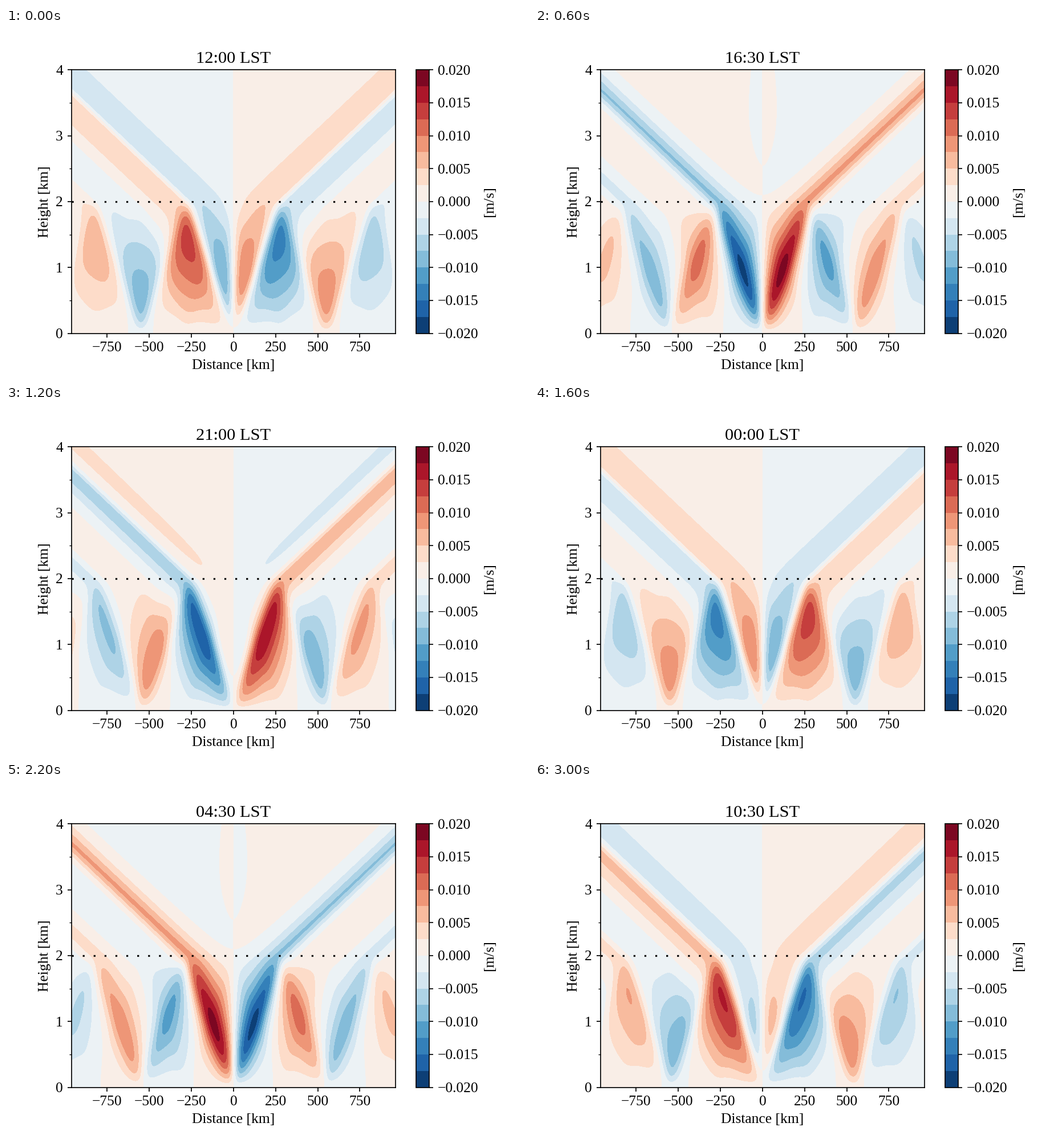
These frames come from a looping animation (917x611 px, 3200 ms). A matplotlib script:

```python
import numpy as np
import matplotlib.pyplot as plt
from matplotlib.animation import FuncAnimation
from matplotlib.ticker import MultipleLocator

# Linear diurnal breeze over a flat surface with two stratified layers
OMEGA = 2 * np.pi / 86400      # 1/s
N1, N2 = 0.01, 0.03            # 1/s, below and above the interface
TOP = 2.0                      # interface height, km
DEPTH = 1.0                    # heating depth, km
COAST = 50.0                   # coastal width, km
Q0 = 1.2e-5                    # heating amplitude, m/s^3
STEPS = 16
WIDTH, HEIGHT = 917, 611       # px
DPI = WIDTH / 6                # six inches wide

plt.rcParams.update({
    "font.family": "Liberation Serif",
    "font.size": 12,
})


def vertical_modes(k, z):
    """Vertical structure G(z, k) with G = 0 at the ground, radiation aloft."""
    q, r = 1 / DEPTH, N2 / N1
    p1 = 1 / (q**2 + k**2)
    p2 = 1 / (q**2 + (r * k)**2)
    jump = (p1 - p2) * np.exp(-q * TOP)
    s, c = np.sin(k * TOP), np.cos(k * TOP)
    a = (p1 * (1j * r * c - s) + jump * (q / k - 1j * r)) / (c + 1j * r * s)
    b = jump + a * s - p1 * c

    zz = z[:, None]
    heat = np.exp(-q * zz)
    low = p1 * (heat - np.cos(k * zz)) + a * np.sin(k * zz)
    high = p2 * heat + b * np.exp(-1j * r * k * (zz - TOP))
    return np.where(zz <= TOP, low, high)


def amplitude(x, z):
    """Complex w(z, x) in m/s; the real field is Re[w exp(-i omega t)]."""
    slope = OMEGA / N1
    dk = 0.03
    k = (np.arange(1400) + 0.5) * dk
    weight = k * np.exp(-k * COAST * slope) * dk
    modes = vertical_modes(k, z) * weight
    return Q0 / (np.pi * N1**2) * modes @ np.sin(np.outer(k, x * slope))


reach = 3.5 * TOP * N1 / OMEGA
half = np.linspace(0, reach, 261)
x = np.concatenate([-half[:0:-1], half])
z = np.linspace(0, 4, 241)
w_half = amplitude(half, z)
w = np.concatenate([-w_half[:, :0:-1], w_half], axis=1)
levels = np.arange(-8, 9) * 0.0025

# The small margin keeps the pixel size from being rounded down
fig, ax = plt.subplots(
    figsize=((WIDTH + 0.01) / DPI, (HEIGHT + 0.01) / DPI), dpi=DPI)
fig.subplots_adjust(left=0.125, right=0.9, bottom=0.125, top=0.88)


def draw_field(step):
    phase = np.exp(-2j * np.pi * step / STEPS)
    return ax.contourf(x, z, (w * phase).real, levels, cmap="RdBu_r")


field = draw_field(0)
cbar = fig.colorbar(field, ax=ax, label="[m/s]")
cbar.set_ticks(levels[::2],
               labels=[f"{v:.3f}".replace("-", "\u2212") for v in levels[::2]])
ax.axhline(TOP, color="k", lw=1.5, ls=(0, (1, 5)))
ax.set(xlim=(-reach, reach), ylim=(0, 4),
       xlabel="Distance [km]", ylabel="Height [km]")
ax.xaxis.set_major_locator(MultipleLocator(250))
ax.yaxis.set_major_locator(MultipleLocator(1))
ax.yaxis.set_minor_locator(MultipleLocator(0.5))
title = ax.set_title("12:00 LST")


def update(step):
    global field
    field.remove()
    field = draw_field(step)
    minutes = (720 + 90 * step) % 1440
    title.set_text(f"{minutes // 60:02d}:{minutes % 60:02d} LST")
    return [field, title]


anim = FuncAnimation(fig, update, frames=STEPS, interval=200,
                     init_func=lambda: [], repeat=True, blit=False)
plt.show()
```
